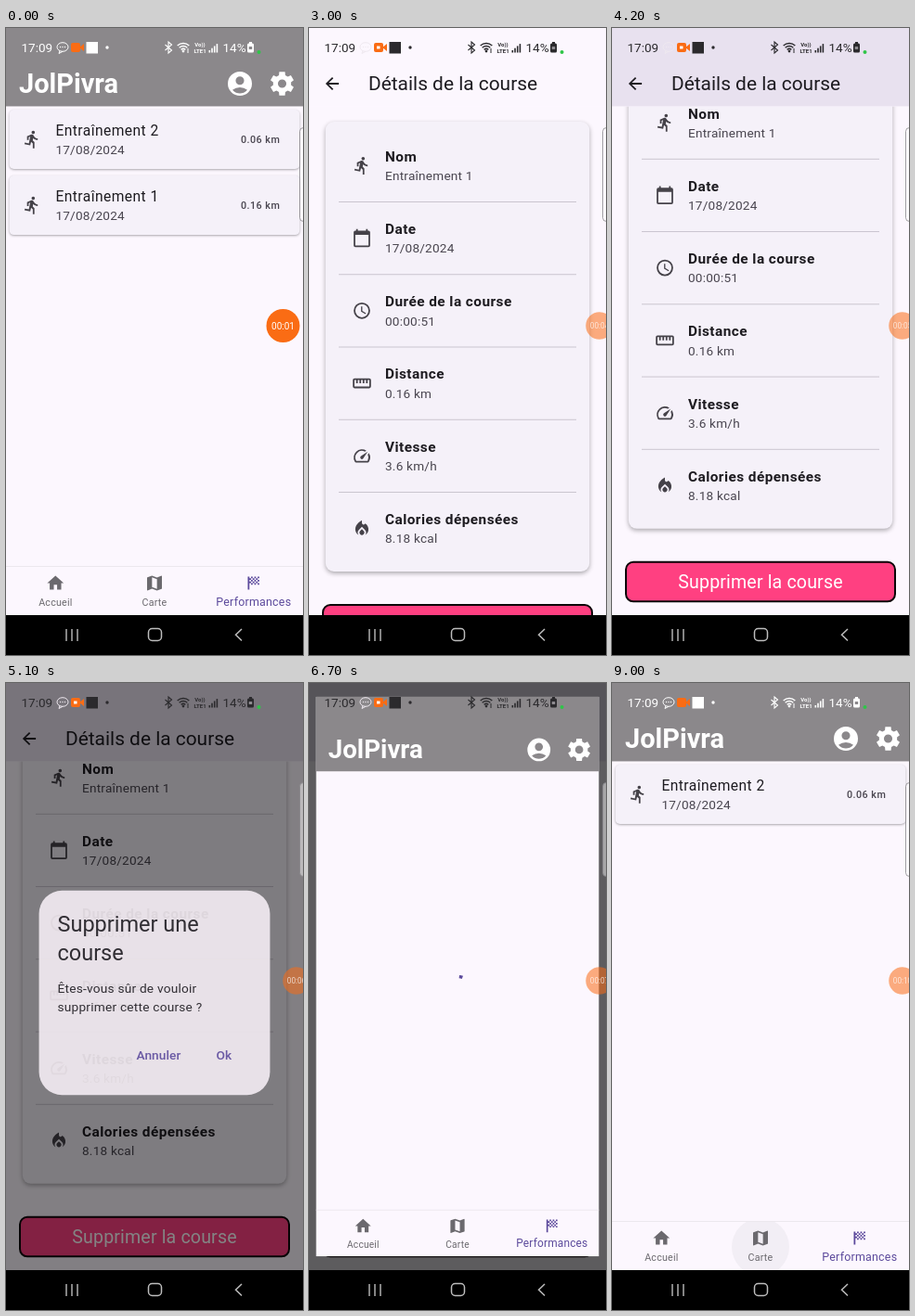
Animation of 320x676 px, one loop 9.1 s. Source, as an HTML page with a canvas:

```html
<!DOCTYPE html>
<html lang="fr">
<head>
<meta charset="utf-8">
<title>Suivi de course</title>
<style>
html, body { margin: 0; width: 100%; height: 100%; overflow: hidden; background: #000; }
canvas { display: block; width: 100%; height: 100%; }
</style>
</head>
<body>
<canvas id="stage"></canvas>
<script>
const W = 320, H = 676, APP_H = 633, BAR_H = 84.44, LOOP = 9100;
const canvas = document.getElementById('stage');
const ctx = canvas.getContext('2d');
const dpr = window.devicePixelRatio || 1;
canvas.width = W * dpr;
canvas.height = H * dpr;

const C = {
  page: '#fcf7fe', card: '#f5f1f9', bar: '#8b888b', ink: '#1d1b20', soft: '#49454f',
  icon: '#454249', nav: '#6b696e', accent: '#5c4a9c', pink: '#ff4081', orange: '#fa6c14',
  dialog: '#f4edf3', line: '#cac5cf'
};

// Icons on a 24-unit grid
const paths = {
  run: 'M13.49 5.48c1.1 0 2-.9 2-2s-.9-2-2-2-2 .9-2 2 .9 2 2 2zm-3.6 13.9l1-4.4 2.1 2v6h2v-7.5l-2.1-2 .6-3c1.3 1.5 3.3 2.5 5.5 2.5v-2c-1.9 0-3.5-1-4.3-2.4l-1-1.6c-.4-.6-1-1-1.7-1-.3 0-.5.1-.8.1l-5.2 2.2v4.7h2v-3.4l1.8-.7-1.6 8.1-4.9-1-.4 2 7 1.4z',
  user: 'M12 2a10 10 0 1 0 0 20a10 10 0 1 0 0-20zm0 4a3.5 3.5 0 1 1 0 7a3.5 3.5 0 1 1 0-7zm0 14c-2.03 0-4.43-.82-6.14-2.88a9.95 9.95 0 0 1 12.28 0C16.43 19.18 14.03 20 12 20z',
  home: 'M10 20v-6h4v6h5v-8h3L12 3 2 12h3v8z',
  map: 'M20.5 3L15 5.1 9 3 3.36 4.9Q3 5 3 5.4V20.5q0 .5.5.5L9 18.9l6 2.1 5.64-1.9q.36-.1.36-.5V3.5q0-.5-.5-.5zM15 19l-6-2.11V5l6 2.11z',
  date: 'M20 3h-1V1h-2v2H7V1H5v2H4q-2 0-2 2v16q0 2 2 2h16q2 0 2-2V5q0-2-2-2zm0 18H4V8h16z',
  clock: 'M12 2a10 10 0 1 0 0 20a10 10 0 1 0 0-20zm0 2a8 8 0 1 1 0 16a8 8 0 1 1 0-16zM11 7h1.5v5.25l4.5 2.67-.75 1.23L11 13z',
  ruler: 'M21 6H3q-2 0-2 2v8q0 2 2 2h18q2 0 2-2V8q0-2-2-2zm0 10H3V8h2v4h2V8h2v4h2V8h2v4h2V8h2v4h2V8h2z',
  speed: 'M20.38 8.57l-1.23 1.85a8 8 0 0 1-.22 7.58H5.07A8 8 0 0 1 15.58 6.85l1.85-1.23A10 10 0 0 0 3.35 19a2 2 0 0 0 1.72 1h13.85a2 2 0 0 0 1.74-1 10 10 0 0 0-.27-10.44zm-9.79 6.84a2 2 0 0 0 2.83 0l5.66-8.49-8.49 5.66a2 2 0 0 0 0 2.83z',
  fire: 'M12 12.9l-2.13 2.09A2.9 2.9 0 0 0 9 17.06C9 18.68 10.35 20 12 20s3-1.32 3-2.94a2.9 2.9 0 0 0-.87-2.07zM16 6l-.44.55C14.38 8.02 12 7.19 12 5.3V2S4 6 4 13c0 2.92 1.56 5.47 3.89 6.86A4.9 4.9 0 0 1 8.47 13.56L12 10.1l3.53 3.47a4.9 4.9 0 0 1 .62 6.25c1.89-1.15 3.29-3.06 3.71-5.3C20.52 10.97 18.79 7.62 16 6z',
  back: 'M20 11H7.83l5.59-5.59L12 4l-8 8 8 8 1.41-1.41L7.83 13H20z'
};
const icons = {};
for (const k in paths) icons[k] = new Path2D(paths[k]);
icons.gear = gear();
icons.flag = flag();

function gear() {
  const p = new Path2D();
  for (let i = 0; i < 6; i++) {
    const a = i * Math.PI / 3 - Math.PI / 2;
    for (const [d, r] of [[-.36, 7.5], [-.24, 10], [.24, 10], [.36, 7.5]])
      p.lineTo(12 + r * Math.cos(a + d), 12 + r * Math.sin(a + d));
  }
  p.closePath();
  p.moveTo(15.5, 12);
  p.arc(12, 12, 3.5, 0, 7);
  return p;
}

function flag() {
  const p = new Path2D();
  p.rect(5, 4, 2, 16);
  for (let i = 0; i < 6; i++)
    for (let j = 0; j < 5; j++)
      if ((i + j) % 2) p.rect(7 + 2 * i, 4 + 2 * j, 2, 2);
  return p;
}

const clamp = v => Math.max(0, Math.min(1, v));
const ramp = (t, a, b) => clamp((t - a) / (b - a));
const ease = p => p * p * (3 - 2 * p);
const mix = (a, b, p) => a + (b - a) * p;

function icon(name, x, y, size, color) {
  ctx.save();
  ctx.translate(x - size / 2, y - size / 2);
  ctx.scale(size / 24, size / 24);
  ctx.fillStyle = color;
  ctx.fill(icons[name], 'evenodd');
  ctx.restore();
}

function text(str, x, y, size, color, { weight = 400, gap = 0, align = 'left' } = {}) {
  ctx.font = `${weight} ${size}px Roboto, sans-serif`;
  ctx.letterSpacing = gap + 'px';
  ctx.textAlign = align;
  ctx.fillStyle = color;
  ctx.fillText(str, x, y);
}

function rect(x, y, w, h, color) {
  ctx.fillStyle = color;
  ctx.fillRect(x, y, w, h);
}

function rounded(x, y, w, h, r, fill, stroke, width = 1) {
  ctx.beginPath();
  ctx.roundRect(x, y, w, h, r);
  if (fill) { ctx.fillStyle = fill; ctx.fill(); }
  if (stroke) { ctx.strokeStyle = stroke; ctx.lineWidth = width; ctx.stroke(); }
}

function disc(x, y, r, color) {
  ctx.beginPath();
  ctx.arc(x, y, r, 0, 7);
  ctx.fillStyle = color;
  ctx.fill();
}

function stroke(points, color, width) {
  ctx.beginPath();
  points.forEach(([x, y]) => ctx.lineTo(x, y));
  ctx.strokeStyle = color;
  ctx.lineWidth = width;
  ctx.stroke();
}

function card(x, y, w, h, r, blur) {
  ctx.save();
  ctx.shadowColor = 'rgba(0,0,0,.32)';
  ctx.shadowBlur = blur * dpr;
  ctx.shadowOffsetY = blur * .4 * dpr;
  rounded(x, y, w, h, r, C.card);
  ctx.restore();
}

function runCard(y, n, dist, pressed) {
  card(3.56, y, 312.9, 64, 5, 2.5);
  if (pressed) rounded(3.56, y, 312.9, 64, 5, `rgba(29,27,32,${.1 * pressed})`);
  icon('run', 28, y + 32, 21.3, C.icon);
  text('Entraînement ' + n, 53.4, y + 27.5, 15.6, C.ink, { gap: .44 });
  text('17/08/2024', 53.4, y + 47.7, 13.6, C.soft, { gap: .22 });
  text(dist, 253, y + 36, 10.8, C.soft, { weight: 500, gap: .44 });
}

function spinner(t) {
  const age = t - 6700;
  const from = -Math.PI / 2 + .12 + age * .0016;
  ctx.beginPath();
  ctx.arc(160, 332.5, 16, from, from + .24 + age * age * .00002);
  ctx.strokeStyle = C.accent;
  ctx.lineWidth = 3.6;
  ctx.stroke();
}

function homePage(t) {
  rect(0, 0, W, APP_H, C.page);
  rect(0, 0, W, BAR_H, C.bar);
  text('JolPivra', 14, 69.5, 29, '#fff', { weight: 700 });
  icon('user', 252, 60, 31.2, '#fff');
  icon('gear', 297.5, 60, 31.2, '#fff');

  const reloaded = t > 6000;
  if (reloaded && t < 7000) spinner(t);
  else {
    runCard(88, 2, '0.06 km', 0);
    if (!reloaded) runCard(159.1, 1, '0.16 km', ramp(t, 2400, 2600));
  }

  rect(0, 580, W, 1, '#ece8ee');
  if (t >= 8100) {
    ctx.save();
    ctx.beginPath();
    ctx.rect(0, 581, W, 52);
    ctx.clip();
    disc(160, 608, 31, '#f2eef5');
    ctx.restore();
  }
  const tab = { gap: .22, align: 'center' };
  icon('home', 53.3, 598.5, 21.3, C.nav);
  icon('map', 160, 598.5, 21.3, C.nav);
  icon('flag', 266.7, 598.5, 21.3, C.accent);
  text('Accueil', 53.4, 623, 10.7, C.nav, tab);
  text('Carte', 160, 623, 10.7, C.nav, tab);
  text('Performances', 266.8, 622.5, 12.45, C.accent, tab);
}

const rows = [
  ['run', 'Nom', 'Entraînement 1'],
  ['date', 'Date', '17/08/2024'],
  ['clock', 'Durée de la course', '00:00:51'],
  ['ruler', 'Distance', '0.16 km'],
  ['speed', 'Vitesse', '3.6 km/h'],
  ['fire', 'Calories dépensées', '8.18 kcal']
];

function detailPage(t) {
  const scroll = ease(ramp(t, 3400, 4000));
  rect(0, 0, W, APP_H, C.page);
  ctx.save();
  ctx.translate(0, -46.2 * scroll);
  card(17.8, 101, 284.4, 485, 9, 5);
  rows.forEach(([glyph, label, value], i) => {
    const y = 148.3 + i * 78.25;
    icon(glyph, 57, y, 21.3, C.icon);
    text(label, 82, y - 4.6, 15.4, C.ink, { weight: 700, gap: .44 });
    text(value, 82, y + 15.7, 13.6, C.soft, { gap: .22 });
    if (i < 5) rect(32, y + 38.7, 256, 1, C.line);
  });
  rounded(15, 622, 290, 42.5, 8, C.pink, '#0c0608', 2);
  text('Supprimer la course', 160, 649.7, 19.6, '#fff', { gap: .15, align: 'center' });
  ctx.restore();

  rect(0, 0, W, BAR_H, C.page);
  ctx.save();
  ctx.globalAlpha *= ramp(t, 3400, 3700);
  rect(0, 0, W, BAR_H, '#e8e1ef');
  ctx.restore();
  icon('back', 25, 60, 21.3, C.ink);
  text('Détails de la course', 64, 67, 20.9, C.ink);
}

function dialog(t) {
  const show = t < 6000 ? mix(.9, 1, ramp(t, 5100, 5200)) : 1 - ramp(t, 6690, 6840);
  rect(0, 0, W, APP_H, `rgba(0,0,0,${.54 * show})`);
  ctx.save();
  ctx.globalAlpha = show;
  rounded(35.55, 223.8, 248.9, 220.4, 24.9, C.dialog);
  text('Supprimer une', 55.5, 267.5, 23.5, C.ink);
  text('course', 55.5, 298.7, 23.5, C.ink);
  text('Êtes-vous sûr de vouloir', 55.5, 334, 13.7, C.ink, { gap: .22 });
  text('supprimer cette course ?', 55.5, 353.7, 13.7, C.ink, { gap: .22 });
  if (t >= 6300) rounded(216, 384, 38, 35, 17.5, `rgba(92,74,156,${.12 * ramp(t, 6200, 6400)})`);
  text('Annuler', 140.5, 406.3, 13.7, C.accent, { weight: 500, gap: .1 });
  text('Ok', 226.5, 406.3, 13.7, C.accent, { weight: 500, gap: .1 });
  ctx.restore();
}

// Quick start, long settle
function zoomCurve(p) {
  const knee = 1 / 6;
  if (p < knee) return .4 * (p / knee) ** 3;
  return 1 - .6 * (1 - (p - knee) / (1 - knee)) ** 4;
}

// Places a page above the previous one, growing into view
function enter(page, t, start) {
  const p = ramp(t, start, start + 300);
  if (p <= 0) return;
  if (p < 1) rect(0, 0, W, APP_H, `rgba(0,0,0,${.6 * ramp(p, .2075, .4175)})`);
  const s = .85 + .15 * zoomCurve(p);
  ctx.save();
  ctx.globalAlpha = ramp(p, .125, .25);
  ctx.translate(W / 2, APP_H / 2);
  ctx.scale(s, s);
  ctx.translate(-W / 2, -APP_H / 2);
  ctx.beginPath();
  ctx.rect(0, 0, W, APP_H);
  ctx.clip();
  page(t);
  ctx.restore();
}

function statusBar(dark) {
  const c = dark ? '#2b2a2d' : '#fff';
  text('17:09', 16.5, 26, 13.5, c);

  const bubble = dark ? '#efe9f0' : '#fff';
  ctx.beginPath();
  ctx.ellipse(61, 20.5, 6, 4.8, 0, 0, 7);
  ctx.strokeStyle = bubble;
  ctx.lineWidth = 1;
  ctx.stroke();
  stroke([[58, 24.5], [57, 27.5], [61, 25.3]], bubble, 1);
  for (const x of [58.5, 61, 63.5]) disc(x, 20.5, .7, bubble);
  rounded(70, 16, 10, 10, 2, C.orange);
  ctx.beginPath();
  ctx.moveTo(79, 21);
  ctx.lineTo(84, 17);
  ctx.lineTo(84, 25);
  ctx.fill();
  if (dark) rect(73, 19.5, 3.5, 3, '#fff');
  rect(86.5, 15, 12.5, 12.5, c);
  disc(109, 21, 1.7, c);

  stroke([[171.5, 18], [178.5, 24], [175, 27], [175, 15], [178.5, 18], [171.5, 24]], c, 1.1);
  ctx.strokeStyle = c;
  ctx.lineWidth = 1.4;
  for (const r of [3.5, 6.5, 9.5]) {
    ctx.beginPath();
    ctx.arc(191, 26, r, -2.3, -.84);
    ctx.stroke();
  }
  disc(191, 25, 1.4, c);
  stroke([[196, 22], [196, 27]], c, 1);
  const tiny = { weight: 700, align: 'center' };
  text('Vo))', 209, 20.3, 6, c, tiny);
  text('LTE1', 209, 26.6, 6, c, tiny);
  for (let i = 0; i < 4; i++) rect(218.5 + i * 2.7, 24 - i * 2.3, 1.6, 2.5 + i * 2.3, c);
  text('14%', 233.5, 26, 13.5, c);
  rounded(260, 16.5, 7, 10, 1.5, c);
  rect(262, 15, 3, 2, c);
  rect(261.7, 20, 3.5, 3, dark ? '#8d8a8f' : C.bar);
  disc(272.5, 26, 2, '#2fc548');
}

function systemNav() {
  const c = '#bdbdbd';
  rect(0, APP_H, W, H - APP_H, '#000');
  for (const x of [65, 71, 77]) stroke([[x, 648], [x, 661]], c, 1.4);
  rounded(153.5, 647.5, 14, 13, 4, null, c, 1.5);
  stroke([[254, 648], [247.5, 654.3], [254, 660.5]], c, 1.5);
}

const ticks = [900, 1900, 2900, 3900, 5100, 6100, 6900, 8100, 8900];

function recorder(t) {
  const p = ease(ramp(t, 0, 600));
  const n = 1 + ticks.filter(k => t >= k).length;
  ctx.save();
  ctx.globalAlpha = mix(1, .55, p);
  ctx.translate(mix(298.5, 313, p), 321);
  const s = mix(1, .82, p);
  ctx.scale(s, s);
  disc(0, 0, 18, C.orange);
  ctx.globalAlpha = mix(1, .7, p);
  text('00:' + String(n).padStart(2, '0'), 0, 3.6, 10, '#fff', { align: 'center' });
  ctx.restore();
}

function render(t) {
  ctx.setTransform(dpr, 0, 0, dpr, 0, 0);
  ctx.globalAlpha = 1;
  ctx.clearRect(0, 0, W, H);

  if (t < 2930) homePage(t);
  if (t < 6912) enter(detailPage, t, 2630);
  if (t >= 5100 && t < 6840) dialog(t);
  enter(homePage, t, 6612);

  systemNav();
  statusBar(t >= 2800 && t < 6800);
  rounded(316.5, 107.5, 10, 101, 4, 'rgba(255,255,255,.45)', 'rgba(130,128,133,.75)');
  recorder(t);
}

const begin = performance.now();
function tick() {
  const t = Math.max(0, performance.now() - begin) % LOOP;
  render(Math.floor(t / 100) * 100);
  requestAnimationFrame(tick);
}
tick();
</script>
</body>
</html>
```
